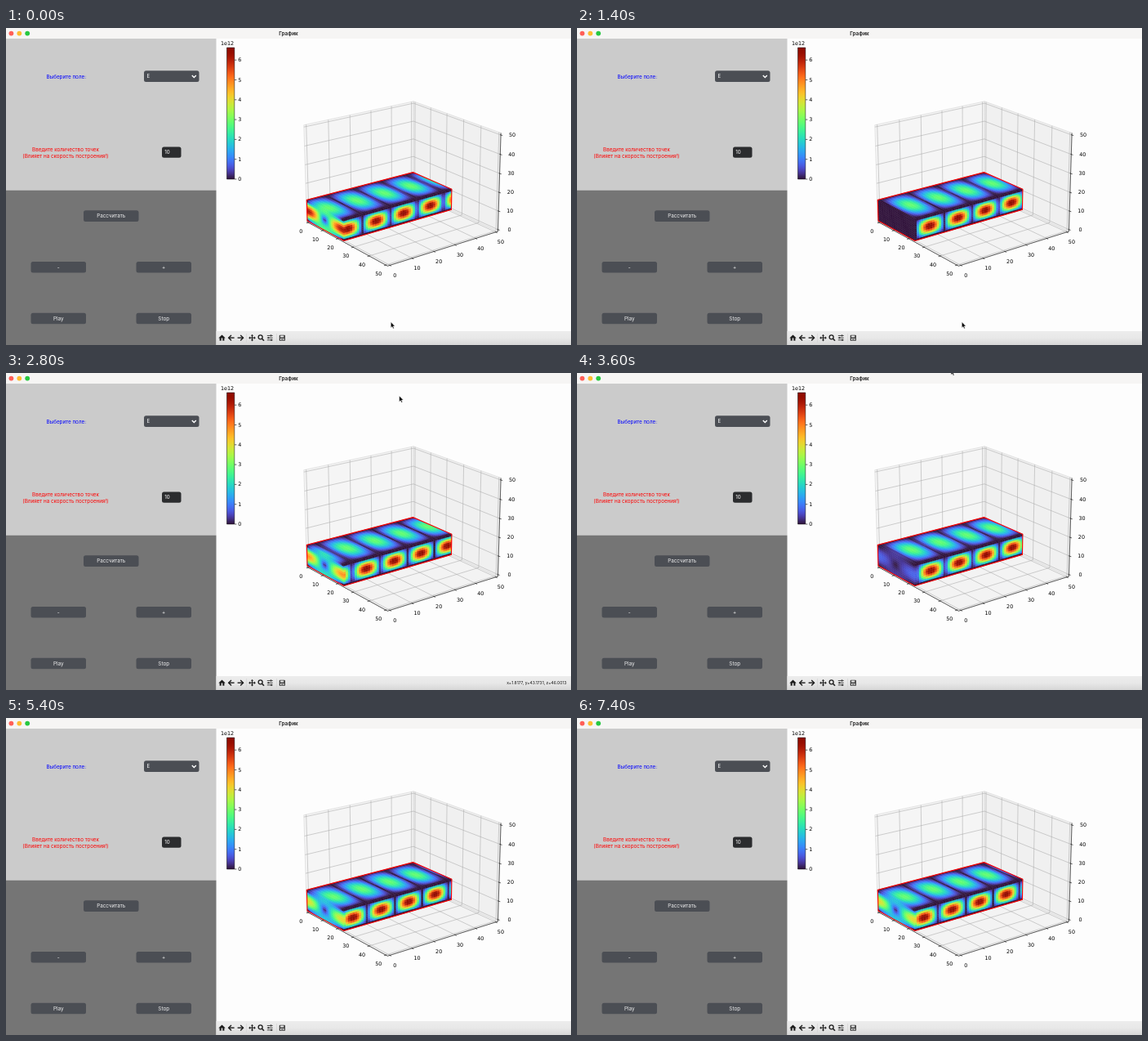
Recreate the animation shown at these times as an HTML page with a canvas. Size 692 px wide and 388 px high, loop 7500 ms.

```html
<!DOCTYPE html>
<html lang="ru">
<head>
<meta charset="utf-8">
<title>График</title>
<style>
html, body { margin: 0; width: 100%; height: 100%; overflow: hidden; background: #fdfdfd; }
canvas { display: block; }
</style>
</head>
<body>
<canvas id="stage" width="692" height="388"></canvas>
<script>
const g = document.getElementById('stage').getContext('2d');
const LOOP = 7500, STEP = 100;
const UI = 'Inter, "Open Sans", sans-serif', PLOT = '"DejaVu Sans", sans-serif';

function rect(x, y, w, h, color, r = 0) {
  g.fillStyle = color;
  g.beginPath();
  g.roundRect(x, y, w, h, r);
  g.fill();
}
function dot(x, y, r, color) {
  g.fillStyle = color;
  g.beginPath();
  g.arc(x, y, r, 0, 2 * Math.PI);
  g.fill();
}
function text(s, x, y, color, size = 6.3, align = 'center', family = UI, weight = 400) {
  g.font = `${weight} ${size}px ${family}`;
  g.textAlign = align;
  g.textBaseline = 'middle';
  g.fillStyle = color;
  g.fillText(s, x, y);
}
function path(points, { fill, stroke, width = 0.6, close = !!fill }) {
  g.beginPath();
  points.forEach(p => g.lineTo(p[0], p[1]));
  if (close) g.closePath();
  if (fill) { g.fillStyle = fill; g.fill(); }
  if (stroke) { g.strokeStyle = stroke; g.lineWidth = width; g.stroke(); }
}
// Vertical gradient through evenly spaced colours
function gradient(y0, y1, colors) {
  const fill = g.createLinearGradient(0, y0, 0, y1);
  colors.forEach((c, i) => fill.addColorStop(i / (colors.length - 1), c));
  return fill;
}
// Piecewise linear value of rows [time, v1, v2, ...]
function track(rows, t) {
  let i = 0;
  while (i < rows.length - 2 && t > rows[i + 1][0]) i++;
  const a = rows[i], b = rows[i + 1];
  const k = Math.max(0, Math.min(1, (t - a[0]) / (b[0] - a[0])));
  return a.slice(1).map((v, j) => v + (b[j + 1] - v) * k);
}

// Turbo colour map as polynomials, with a purple lift at the dark end
const TURBO = [
  [0.1357, 4.6154, -42.6603, 132.1311, -152.9424, 59.2864],
  [0.0914, 2.1942, 4.8430, -14.1850, 4.2773, 2.8296],
  [0.1067, 12.6419, -60.5820, 110.3628, -89.9031, 27.3482]
];
const LIFT = [0.054, -0.02, 0.125];
const turbo = v => 'rgb(' + TURBO.map((c, i) => {
  const level = c.reduceRight((s, k) => s * v + k, 0) + LIFT[i] * Math.exp(-80 * v);
  return Math.round(255 * Math.max(0, Math.min(1, level)));
}) + ')';

// Perspective view of the 0..50 cube
const LO = -1.04, HI = 51.04, SPAN = HI - LO;
const AZIM = 37.4 * Math.PI / 180, ELEV = 20 * Math.PI / 180;
function project([x, y, z]) {
  const u = (x - LO) / SPAN - 0.5, v = (y - LO) / SPAN - 0.5, w = ((z - LO) / SPAN - 0.5) * 0.75;
  const right = Math.sin(AZIM) * u + Math.cos(AZIM) * v;
  const near = Math.cos(AZIM) * u - Math.sin(AZIM) * v;
  const depth = Math.cos(ELEV) * near + Math.sin(ELEV) * w;
  const up = Math.cos(ELEV) * w - Math.sin(ELEV) * near;
  const s = 169.5 / (1 - depth / 8.4);
  return [484.2 + right * s, 184.2 - up * s];
}
const line3 = (points, style) => path(points.map(project), style);

function button(label, x, y) {
  rect(x, y, 67.5, 13.6, '#4b4e54', 2.5);
  text(label, x + 33.7, y + 7.2, '#f2f2f2');
}
function drawWindow() {
  rect(0, 0, 692, 388, '#fdfdfd');
  rect(0, 0, 692, 13, '#f6f5f4');
  ['#ff5f57', '#febc2e', '#28c840'].forEach((c, i) => dot(6.4 + i * 9.9, 6.6, 2.9, c));
  text('График', 346, 6.8, '#333', 6.3, 'center', UI, 700);

  rect(0, 13, 257.5, 186, '#cbcbcb');
  rect(0, 198.7, 257.5, 189.3, '#757575');
  text('Выберите поле:', 73.7, 59.7, '#00f');
  text('Введите количество точек', 73, 149.2, '#f00');
  text('(Влияет на скорость построения!)', 73, 156.8, '#f00');
  rect(169, 52.3, 67.5, 13.6, '#4b4e54', 2.5);
  text('E', 172.5, 59.6, '#fff', 6.2, 'left');
  path([[227.8, 58], [230.3, 60.6], [232.8, 58]], { stroke: '#fff', width: 1.4 });
  rect(191, 145.5, 23.5, 13.2, '#2b2c2e', 2.5);
  text('10', 194.3, 152.3, '#fff', 6.2, 'left');
  button('Рассчитать', 95, 223.3);
  button('-', 30.5, 286);
  button('+', 159.5, 286);
  button('Play', 30.5, 348.7);
  button('Stop', 159.5, 348.7);
}

function drawToolbar() {
  const ink = '#1c1c1c', soft = '#3c3c3c';
  rect(257.5, 371, 434.5, 17, gradient(371, 388, ['#ececec', '#e8e8e8', '#d6d6d6']));
  path([[260.3, 379.6], [264.5, 375.6], [268.7, 379.6]], { fill: ink });
  rect(261.6, 379, 2.1, 3.7, ink);
  rect(265.3, 379, 2.1, 3.7, ink);
  for (const [x, d] of [[276, 1], [287.2, -1]]) {
    path([[x - 3.5 * d, 379.2], [x + 3.6 * d, 379.2]], { stroke: ink, width: 1.4 });
    path([[x, 375.9], [x - 3.3 * d, 379.2], [x, 382.5]], { stroke: ink, width: 1.4 });
  }
  for (const [dx, dy] of [[1, 0], [-1, 0], [0, 1], [0, -1]]) {
    const at = (a, b) => [301.5 + dx * a - dy * b, 379.2 + dy * a + dx * b];
    path([at(0, 0), at(3, 0)], { stroke: ink, width: 1.1 });
    path([at(4.3, 0), at(2.4, 1.7), at(2.4, -1.7)], { fill: ink });
  }
  g.beginPath();
  g.arc(311.6, 378.3, 2.5, 0, 2 * Math.PI);
  g.strokeStyle = ink;
  g.lineWidth = 1.3;
  g.stroke();
  path([[313.4, 380.2], [316, 382.8]], { stroke: ink, width: 1.6 });
  [[376.5, 324.5], [379.2, 321.5], [381.9, 325]].forEach(([y, x]) => {
    path([[319.8, y], [326.7, y]], { stroke: soft, width: 0.9 });
    rect(x - 0.8, y - 1.1, 1.6, 2.2, soft);
  });
  rect(334.7, 375.7, 7.2, 7.2, soft, 1);
  rect(336, 376.5, 4.2, 2, '#e6e6e6');
  rect(336, 379.9, 4.6, 2.4, '#e6e6e6');
  rect(337, 380.6, 2.6, 1.1, soft);
  for (const x of [294, 331]) rect(x, 374, 0.5, 11, '#ccc');
}

function drawColorbar() {
  const top = 24, bottom = 185;
  const colors = Array.from({ length: 49 }, (_, i) => turbo(i / 48));
  rect(270.5, top, 9.3, bottom - top, gradient(bottom, top, colors));
  path([[270.5, top], [279.8, top], [279.8, bottom], [270.5, bottom]], { stroke: '#000', width: 0.5, close: true });
  for (let k = 0; k <= 6; k++) {
    const y = bottom - k * 24.3;
    path([[280, y], [282.4, y]], { stroke: '#000' });
    text(k, 284.2, y + 0.4, '#000', 6.4, 'left', PLOT);
  }
  text('1e12', 263, 19.6, '#000', 6.4, 'left', PLOT);
}

function drawAxes() {
  const L = [LO, LO, LO], F = [HI, LO, LO], R = [HI, HI, LO], B = [LO, HI, LO];
  const LT = [LO, LO, HI], RT = [HI, HI, HI], BT = [LO, HI, HI];
  const pane = (fill, ...corners) => line3(corners, { fill, stroke: '#d4d4d4', width: 0.6 });
  pane('#f5f5f5', L, B, BT, LT);
  pane('#f0f0f0', B, R, RT, BT);
  pane('#f3f3f3', L, F, R, B);

  const grid = { stroke: '#a9a9a9', width: 0.55 }, ink = { stroke: '#000', width: 0.6 };
  function tick(point, dx, dy, label, lx, ly) {
    const [x, y] = project(point);
    path([[x - dx * 0.4, y - dy * 0.4], [x + dx, y + dy]], ink);
    text(label, x + lx, y + ly, '#000', 6.4, 'center', PLOT);
  }
  for (let k = 0; k <= 50; k += 10) {
    line3([[k, LO, LO], [k, HI, LO], [k, HI, HI]], grid);
    line3([[HI, k, LO], [LO, k, LO], [LO, k, HI]], grid);
    line3([[LO, LO, k], [LO, HI, k], [HI, HI, k]], grid);
    tick([k, LO, LO], -2.2, 0.7, k, -8.8, 11.3);
    tick([HI, k, LO], 1.8, 1, k, 6, 12.6);
    tick([HI, HI, k], 2.2, 0.7, k, 14, 0.6);
  }
  line3([L, F, R, RT], ink);
}

// Waveguide carrying a TE11 wave; u, v, w run from 0 to 1 across x, y, z
const MIN = [-1, -0.8, -0.6], MAX = [23.7, 50.9, 10.9], COUNT = [24, 51, 11];
const HALF_WAVES = 3.88;
const inBox = p => project(p.map((k, i) => MIN[i] + (MAX[i] - MIN[i]) * k));

function field(u, v, w, phase) {
  const ex = Math.cos(Math.PI * u) * Math.sin(Math.PI * w);
  const ez = 10 / 23 * Math.sin(Math.PI * u) * Math.cos(Math.PI * w);
  return Math.hypot(ex, ez) * Math.abs(Math.cos(Math.PI * (HALF_WAVES * v - phase)));
}
function drawFace(a, b, fixed, side, phase) {
  const n = COUNT[a], m = COUNT[b];
  const place = (s, t) => {
    const p = [];
    p[a] = s; p[b] = t; p[fixed] = side;
    return p;
  };
  for (let i = 0; i < n; i++) for (let j = 0; j < m; j++) {
    const color = turbo(field(...place(i / (n - 1), j / (m - 1)), phase));
    const quad = [[i, j], [i + 1, j], [i + 1, j + 1], [i, j + 1]];
    path(quad.map(([s, t]) => inBox(place(s / n, t / m))), { fill: color, stroke: color, width: 0.4 });
  }
}
function drawWave(phase) {
  drawFace(0, 2, 1, 0, phase);
  drawFace(0, 1, 2, 1, phase);
  drawFace(1, 2, 0, 1, phase);
  const outline = [[0, 0, 0], [0, 0, 1], [0, 1, 1], [1, 1, 1], [1, 1, 0], [1, 0, 0]];
  path(outline.map(inBox), { stroke: '#f00', width: 1.1, close: true });
}

// Crest position in half waves
const PHASE = [[0, 0.11], [1400, 1.5], [2800, 2.76], [4500, 4.41], [5400, 5.29], [6700, 6.62], [7400, 7.29]];
const POINTER = [[1700, 471.3, 359.8], [2400, 478, 58], [2800, 481.6, 28], [3200, 458, -5]];

function drawPointer(t) {
  const [x, y] = track(POINTER, t);
  if (t > 1700 && t < 3200) {
    const pos = [1.8177, 43.1731 + (x - 481.6) * 0.4, 46.0013 - (y - 28) / 2.4];
    text(pos.map((v, i) => 'xyz'[i] + '=' + v.toFixed(4)).join(', '), 686.5, 379.6, '#111', 5, 'right');
  }
  if (t >= 4800) return;
  const shape = [[0, 0], [0, 7.2], [1.7, 5.7], [2.8, 8.2], [4, 7.7], [2.9, 5.3], [5, 5.1]];
  path(shape.map(([dx, dy]) => [x + dx, y + dy]), { fill: '#000', stroke: '#fff', width: 0.5 });
}

let shown = -1;
function frame(now) {
  const t = Math.floor(now % LOOP / STEP) * STEP;
  if (t !== shown) {
    shown = t;
    drawWindow();
    drawColorbar();
    drawAxes();
    drawWave(track(PHASE, t)[0]);
    drawToolbar();
    drawPointer(t);
  }
  requestAnimationFrame(() => frame(performance.now() - start));
}
const start = performance.now();
frame(0);
</script>
</body>
</html>
```
